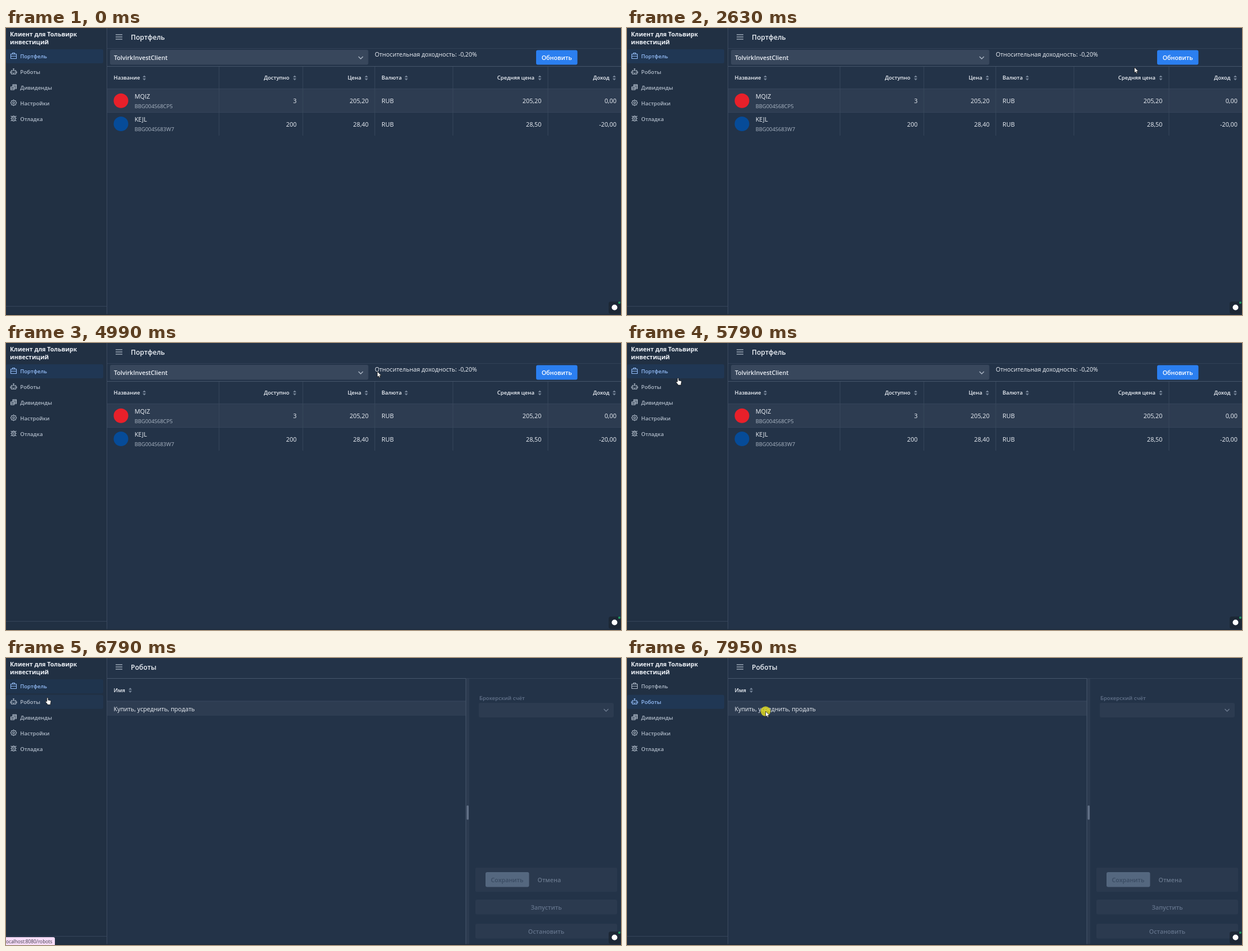
These frames come from a looping animation (1094 px wide and 512 px high, 8000 ms). An HTML page:

```html
<!DOCTYPE html>
<html lang="ru">
<head>
<meta charset="utf-8">
<title>Портфель</title>
<style>
html, body { margin: 0; width: 100%; height: 100%; overflow: hidden; background: #233348; }
svg { display: block; width: 1094px; height: 512px; font-family: "Open Sans", "Noto Sans", sans-serif; }
.icon { fill: none; stroke: currentColor; stroke-width: 1.1; stroke-linejoin: round; stroke-linecap: round; }
</style>
</head>
<body>
<svg id="stage" viewBox="0 0 1094 512"></svg>
<script>
const LOOP = 8000, PAGE_SWITCH = 6790, NAV_SWITCH = 6860;
const NAV_STEP = 27.8;
const LIGHT = '#eef2f8', MUTED = '#adb8c6', LINE = '#3b4a5f', FIELD = '#38475c', DIM = '#62728a';

const rect = (x, y, w, h, fill, r = 0, extra = '') =>
  `<rect x="${x}" y="${y}" width="${w}" height="${h}" rx="${r}" fill="${fill}" ${extra}/>`;
const text = (x, y, s, size = 10.7, fill = LIGHT, weight = 400, anchor = 'start') =>
  `<text x="${x}" y="${y}" font-size="${size}" fill="${fill}" font-weight="${weight}" text-anchor="${anchor}">${s}</text>`;
const circle = (x, y, r, fill) => `<circle cx="${x}" cy="${y}" r="${r}" fill="${fill}"/>`;
const chevron = (x, y, color, id = '') =>
  `<path ${id} d="M${x - 4} ${y - 2}l4 4 4-4" fill="none" stroke="${color}" stroke-width="1.4"/>`;
const sorter = (x, y) =>
  `<path d="M${x - 3} ${y - 1}l3-3.4 3 3.4zM${x - 3} ${y + 1}l3 3.4 3-3.4z" fill="#77869a"/>`;
const header = (x, y, s, sortX, anchor) => text(x, y + 3.4, s, 9.5, LIGHT, 600, anchor) + sorter(sortX, y);

// Icons are drawn around (0, 0)
const icons = [
  'M-5-3.5H5V4.5H-5zM-2-3.5V-5.5H2V-3.5M-5 .3H5',
  'M-4-2H4V4.5H-4zM0-2V-5M-1-5H1M-5.5 0V2.5M5.5 0V2.5M-1.8 .5V1M1.8 .5V1M-1.5 3H1.5',
  'M-5-.5H1V4.5H-5zM-5 2H1M-1.5-.5V-4.5H5V2.5H1M-1.5-2.5H5M1 0H5',
  'M0-5.2L1.4-3.6 3.6-3.9 3.9-1.7 5.2 0 3.9 1.7 3.6 3.9 1.4 3.7 0 5.2-1.4 3.7-3.6 3.9-3.9 1.7-5.2 0-3.9-1.7-3.6-3.9-1.4-3.6zM-1.7 0A1.7 1.7 0 1 1 1.7 0 1.7 1.7 0 1 1-1.7 0',
  'M-2.7-2.5H2.7V2A2.7 2.7 0 0 1-2.7 2zM-2-2.5A2 2 0 0 1 2-2.5M0-1V2.5M-2.7 0H-5M2.7 0H5M-2.7-2L-4.5-4M2.7-2L4.5-4M-2.5 2.5L-4.5 4.5M2.5 2.5L4.5 4.5'
];
const navNames = ['Портфель', 'Роботы', 'Дивиденды', 'Настройки', 'Отладка'];

const sidebar = rect(0, 0, 179, 512, '#213043') + rect(179, 0, 1, 512, LINE) +
  rect(0, 496, 179, 1, '#35445a') +
  text(7, 14.5, 'Клиент для Тольвирк', 10.6, LIGHT, 700) +
  text(7, 28.8, 'инвестиций', 10.6, LIGHT, 700) +
  '<g id="hover">' + rect(0, 38, 173, 25, '#2b7ff0', 3, 'opacity=".07"') + '</g>' +
  '<g id="selected">' + rect(0, 38, 173, 25, '#203754', 3) + '</g>' +
  navNames.map((name, i) => `<g class="nav" transform="translate(0 ${i * NAV_STEP})">
    <path class="icon" transform="translate(13.5 50)" d="${icons[i]}"/>
    ${text(25.3, 54.4, name, 9.5, 'currentColor', 600)}</g>`).join('');

const topbar = rect(180, 36, 914, 1, '#324157') +
  [12, 16, 20].map(y => rect(195, y - .7, 12, 1.3, MUTED)).join('') +
  '<g id="title">' + text(222, 21.2, '', 12.1, LIGHT, 600) + '</g>';

const rows = [
  { y: 130, color: '#e8202a', name: 'MQIZ', code: 'BBG004S68CP5', cells: ['3', '205,20', 'RUB', '205,20', '0,00'] },
  { y: 171.3, color: '#064b98', name: 'KEJL', code: 'BBG004S683W7', cells: ['200', '28,40', 'RUB', '28,50', '-20,00'] }
];
const cellX = [517, 645, 668, 952.5, 1086];

const portfolio = rect(185, 39, 459.5, 26.5, FIELD, 3) +
  text(192, 57.2, 'TolvirkInvestClient', 10.7, LIGHT, 600) +
  chevron(631, 53, MUTED, 'id="arrow"') +
  text(656, 50.6, 'Относительная доходность: -0,20%') +
  rect(943, 39.5, 73.5, 26, '#2b7ff0', 3, 'id="refresh"') +
  text(979.7, 57.4, 'Обновить', 10.7, '#fff', 600, 'middle') +
  rect(180, 68, 914, 1, '#46566b') + rect(180, 108, 914, 42.5, '#2d3c51') +
  rect(180, 108, 914, 1, '#35445a') + rect(180, 150, 914, 1, '#35445a') +
  [379, 528, 656, 795, 964].map(x => rect(x - .5, 69, 1, 123, '#39485d')).join('') +
  header(191.5, 89, 'Название', 246) + header(504, 89, 'Доступно', 513.5, 'end') +
  header(632, 89, 'Цена', 641, 'end') + header(668, 89, 'Валюта', 712) +
  header(940, 89, 'Средняя цена', 949.5, 'end') + header(1073.5, 89, 'Доход', 1082, 'end') +
  rows.map(r => circle(204.5, r.y - .3, 13, r.color) +
    text(228.7, r.y - 4, r.name, 10.9) + text(228.7, r.y + 13, r.code, 9.4, MUTED) +
    r.cells.map((c, i) => text(cellX[i], r.y + 4.4, c, 10.9, LIGHT, 400, i == 2 ? 'start' : 'end')).join('')
  ).join('');

const wideButton = (y, s) => rect(835, y, 252, 26.5, '#2b3a4f', 3) +
  text(961, y + 18, s, 10.7, DIM, 600, 'middle');

const robots = rect(180, 36, 638, 1, '#46566b') + header(191.5, 57.5, 'Имя', 221) +
  rect(180, 77, 638, 26, '#2d3c51') + rect(180, 76.5, 638, 1, '#3a495e') +
  text(191.5, 94.6, 'Купить, усреднить, продать', 10.7) +
  rect(818, 37, 6, 475, '#2c3b50') + rect(817.5, 37, 1, 475, '#46566b') +
  rect(819.5, 263, 3.5, 25.5, '#627187', 1.5) +
  text(842, 74.5, 'Брокерский счёт', 9.5, DIM, 600) +
  rect(841, 80, 240, 26, '#2c3b50', 3) + chevron(1067.5, 93, '#6d7b8f') +
  rect(835, 374, 252, 43, '#2a394e', 2) + rect(853, 382, 77.5, 26.5, '#54677f', 3) +
  text(891.5, 400, 'Сохранить', 10.7, '#3a4b62', 600, 'middle') +
  text(966.3, 400, 'Отмена', 10.7, '#68778c', 600, 'middle') +
  wideButton(431, 'Запустить') + wideButton(474, 'Остановить');

const overlay = rect(0, 510.5, 1094, 1.5, '#1d2a3b') +
  rect(1072, 488, 22, 22, '#1c2735', 4) + circle(1082.5, 498.5, 5, '#fff') + circle(1091, 490, 2, '#1f9c62') +
  '<g id="status"><path d="M0 498H84a3 3 0 0 1 3 3V512H0z" fill="#f6dcf8"/>' +
  text(0, 508.7, 'ocalhost:8080/robots', 8.3, '#3c3744') + '</g>' +
  `<g id="cursor"><circle id="click" r="8.7" fill="#e2dc1e" opacity=".82"/>
   <g stroke="#111" stroke-width=".8" stroke-linejoin="round" fill="#fff">
   <path id="pointer" d="M0 0V10L2.3 7.9 3.9 11.2 5.6 10.4 4.1 7.3H7.2z"/>
   <path id="hand" d="M-1.2 6.5V.8A1.1 1.1 0 0 1 1 .8V4L5 4.8Q6.3 5.2 6 7L5.2 10V12.3H-.6V11L-3.6 7.4Q-3.4 5.8-2 6.3z"/>
   </g></g>`;

const $ = id => document.getElementById(id);
$('stage').innerHTML = sidebar + topbar + `<g id="portfolio">${portfolio}</g><g id="robots">${robots}</g>` + overlay;
const navItems = document.querySelectorAll('.nav'), title = document.querySelector('#title text');

// Pointer path: time, x, y
const path = [
  [530, 715, 384], [670, 560, 222],
  [1200, 560, 222], [1600, 636.5, 61], [1810, 633, 52],
  [2290, 633, 52], [2420, 690, 60], [2630, 902, 70], [2720, 950, 71], [2880, 989, 46],
  [3159, 989, 46], [3160, 964.5, 40], [3920, 964.5, 40], [3980, 963, 42],
  [4300, 800, 60], [4660, 662, 51],
  [4990, 662, 51], [5140, 430, 24], [5270, 212, 41],
  [5530, 212, 41], [5790, 91, 62.8], [6320, 74, 71],
  [7330, 74, 71], [7640, 150, 84], [7950, 246.5, 95], [8000, 246.5, 95]
];
const clicks = [[3160, 3360], [6450, 6650], [7950, 8000]];

function pointerAt(t) {
  const i = path.findIndex(p => p[0] > t);
  if (i < 1) return null;
  const [t0, x0, y0] = path[i - 1], [t1, x1, y1] = path[i];
  const k = (t - t0) / (t1 - t0);
  return [x0 + (x1 - x0) * k, y0 + (y1 - y0) * k];
}

const show = (id, on) => $(id).style.display = on ? '' : 'none';

function draw(t) {
  const pos = pointerAt(t), [x, y] = pos || [-99, -99];
  const onRobots = t >= PAGE_SWITCH, selected = t < NAV_SWITCH ? 0 : 1;
  const inside = (x0, x1) => !onRobots && x > x0 && x < x1 && y > 39 && y < 66;
  const hovered = x > 0 && x < 173 && y > 38 ? Math.floor((y - 37) / NAV_STEP) : -1;

  show('portfolio', !onRobots);
  show('robots', onRobots);
  title.textContent = navNames[onRobots ? 1 : 0];

  $('selected').setAttribute('transform', `translate(0 ${selected * NAV_STEP})`);
  $('selected').setAttribute('opacity', onRobots && !selected ? .65 : 1);
  navItems.forEach((item, i) => item.style.color = i == selected ? '#94bdf8' : '#b0bbc9');
  show('hover', hovered >= 0 && hovered != selected);
  $('hover').setAttribute('transform', `translate(0 ${hovered * NAV_STEP})`);
  show('status', hovered == 1 && t > 6000);

  $('arrow').setAttribute('stroke', inside(185, 645) ? '#dfe5ee' : MUTED);
  const pressed = t >= 3360 && t < 3420;
  $('refresh').setAttribute('fill', pressed ? '#2a6fcf' : inside(943, 1017) ? '#337fe6' : '#2b7ff0');

  show('cursor', pos);
  $('cursor').setAttribute('transform', `translate(${x} ${y})`);
  show('hand', hovered >= 0);
  show('pointer', hovered < 0);
  show('click', clicks.some(([a, b]) => t >= a && t < b));
}

function frame() {
  draw(performance.now() % LOOP);
  requestAnimationFrame(frame);
}
frame();
</script>
</body>
</html>
```
